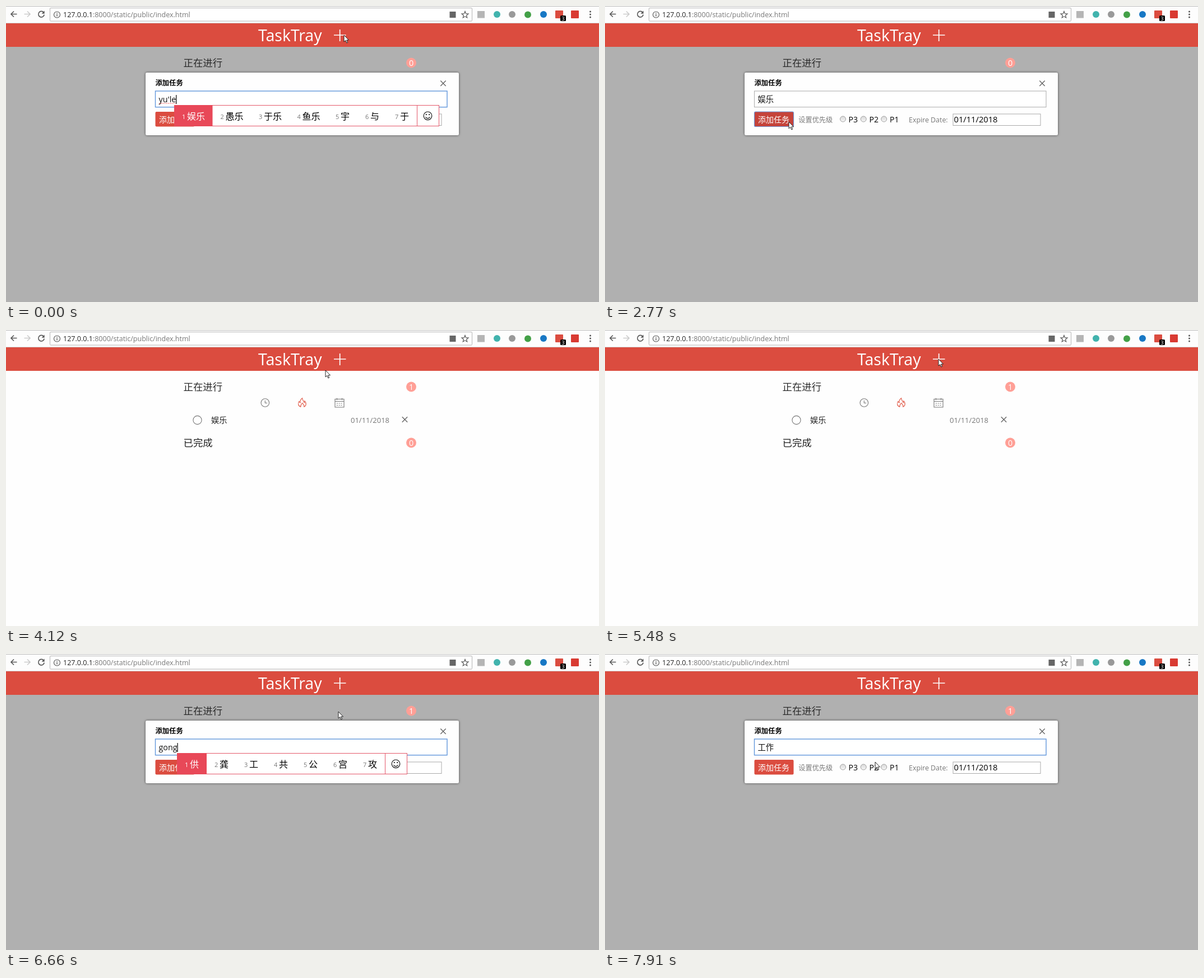
An HTML page for the animation above (8000 ms loop, 1058 px wide and 529 px high).

```html
<!DOCTYPE html>
<html lang="zh-CN">
<head>
<meta charset="utf-8">
<title>TaskTray</title>
<style>
html, body { margin: 0; width: 100%; height: 100%; overflow: hidden; background: #fefefe; }
svg { display: block; width: 1058px; height: 529px; }
text { font-family: "Open Sans", "Noto Sans CJK SC", "Noto Sans CJK", sans-serif; fill: #222; white-space: pre; }
.line { fill: none; stroke: #5a5a5a; stroke-width: 1.7; }
.thin { fill: none; stroke: #777; stroke-width: 1.1; }
.grey { fill: #777; }
.white { fill: #fff; }
.black { fill: #000; }
.mid { text-anchor: middle; }
</style>
</head>
<body>
<svg viewBox="0 0 1058 529">
  <defs>
    <filter id="shadow" x="-5%" y="-15%" width="110%" height="130%">
      <feDropShadow dx="0" dy="0" stdDeviation="2.2" flood-color="#000" flood-opacity=".6"/>
    </filter>
    <linearGradient id="knob" x2="0" y2="1">
      <stop stop-color="#d8d8d8"/><stop offset="1" stop-color="#f6f6f6"/>
    </linearGradient>
    <g id="radio"><circle r="5" fill="url(#knob)" stroke="#a0a0a0"/></g>
    <path id="cross" d="M-4.700-4.700L4.700 4.700M4.700-4.700L-4.700 4.700"/>
  </defs>

  <rect width="1058" height="529" fill="#fefefe"/>
  <rect id="dim" y="73" width="1058" height="456" fill="#b0b0b0"/>

  <!-- browser bar -->
  <rect width="1058" height="31" fill="#fdfdfd"/>
  <path d="M0 .5H1058" stroke="#bcbcbc"/>
  <path d="M0 30.500H1058" stroke="#d5d0d0"/>
  <path class="line" d="M19.500 14.500H9M14 9.500L9 14.500L14 19.500"/>
  <path class="line" style="stroke:#ccc" d="M32.500 14.500H43M38 9.500L43 14.500L38 19.500"/>
  <path class="line" d="M67.200 11.500A5.200 5.200 0 1 0 68.200 15.500"/>
  <path d="M68.700 8.500V13.700H63.500Z" fill="#5a5a5a"/>
  <rect x="78.500" y="3.500" width="753" height="23.500" rx="1.500" fill="#fff" stroke="#b4b4b4"/>
  <circle class="line" style="stroke-width:1.200" cx="91" cy="15.500" r="5.500"/>
  <path d="M91 14.500V18.500M91 12V13.400" stroke="#555" stroke-width="1.300"/>
  <text x="102" y="19.500" font-size="12.500">127.0.0.1<tspan class="grey">:8000/static/public/index.html</tspan></text>
  <rect x="791.500" y="10" width="11" height="11" fill="#666"/>
  <path class="line" style="stroke-width:1.200" d="M819 9.500L820.600 13.600L825 13.900L821.600 16.700L822.700 21L819 18.600L815.300 21L816.400 16.700L813 13.900L817.400 13.600Z"/>
  <rect x="841" y="9" width="13" height="12.500" fill="#b5b5b5"/>
  <circle cx="876" cy="15" r="6" fill="#41b3ad"/>
  <circle cx="903" cy="15" r="6" fill="#999"/>
  <circle cx="931" cy="15.500" r="6" fill="#43a047"/>
  <circle cx="959" cy="15" r="6" fill="#1878c4"/>
  <rect x="980" y="8" width="14" height="14" rx="1" fill="#db4c3f"/>
  <rect x="989" y="17" width="10" height="10" rx="1.500" fill="#000"/>
  <text class="white mid" x="994" y="25.500" font-size="9.500">3</text>
  <rect x="1008" y="8" width="14" height="14" rx="1" fill="#d93a32"/>
  <g fill="#555"><circle cx="1042.500" cy="10" r="1.500"/><circle cx="1042.500" cy="15" r="1.500"/><circle cx="1042.500" cy="20" r="1.500"/></g>

  <!-- page header -->
  <rect y="31" width="1058" height="42" fill="#db4c3f"/>
  <text class="white" x="450" y="63" font-size="28.500">TaskTray</text>
  <path d="M585 52H606.500M595.700 42V63" stroke="#fff" stroke-width="1.700"/>

  <text x="316.500" y="108" font-size="17.400" style="fill:#2b2b2b">正在进行</text>
  <circle cx="723" cy="101.500" r="9" fill="#ff9f96"/>
  <text id="open" class="white mid" x="723" y="106.700" font-size="14.300"></text>

  <g id="list">
    <circle class="thin" cx="462.300" cy="130" r="7.300"/>
    <path class="thin" d="M462.300 126V130.500H466"/>
    <g fill="none" stroke="#e2604f" stroke-width="1.200">
      <path d="M526 137.500C521 135.500 520.500 131.500 523 127.500C523.600 129 524.300 129.800 525.200 130C524.600 126.500 526 123.500 528.600 121.800C528.600 125 531 126.500 532 129.800C532.800 129 533 128 533 127C536.300 131 536 135.500 531.500 137.500"/>
      <path d="M526 137.500C524.500 134.500 527.500 133 528.500 130.500C530.500 133 533 134.500 531.500 137.500"/>
    </g>
    <path class="thin" d="M587 123.500H603V138H587ZM587 127.500H603M590.500 121.500V125M599.500 121.500V125"/>
    <path class="thin" stroke-dasharray="2 1.700" d="M590 131H601M590 134.500H601"/>
    <circle class="thin" cx="341.500" cy="161" r="7.600"/>
    <text x="366" y="166" font-size="14.200">娱乐</text>
    <text class="grey" x="615" y="166" font-size="13">01/11/2018</text>
    <use href="#cross" x="711.500" y="160" stroke="#666" stroke-width="1.400"/>
    <text x="316.500" y="208" font-size="17.400">已完成</text>
    <circle cx="723" cy="201.500" r="9" fill="#ff9f96"/>
    <text class="white mid" x="723" y="206.700" font-size="14.300">0</text>
  </g>

  <g id="dialog">
    <rect x="249" y="119" width="559" height="112" rx="3" fill="#fefefe" filter="url(#shadow)"/>
    <text class="black" x="266.500" y="142" font-size="12.300" font-weight="700">添加任务</text>
    <use href="#cross" x="780" y="138.300" stroke="#666" stroke-width="1.400"/>
    <rect id="field" x="266.500" y="152" width="520.500" height="28.700" fill="#fff"/>
    <text id="entry" x="272.500" y="171.700" font-size="14.300"></text>
    <path id="wave" fill="none" stroke="#f05050" stroke-width="1" stroke-dasharray="2 1.200"/>
    <path id="caret" stroke="#000" stroke-width="1.200"/>
    <rect id="button" x="266.500" y="189" width="70" height="26.500" rx="2"/>
    <text class="white" x="273" y="208" font-size="14">添加任务</text>
    <text class="grey" x="345.300" y="208" font-size="12.200">设置优先级</text>
    <use href="#radio" x="424.500" y="202"/><text class="black" x="434.500" y="208" font-size="14">P3</text>
    <use href="#radio" x="461.200" y="202"/><text class="black" x="471.500" y="208" font-size="14">P2</text>
    <use href="#radio" x="497.700" y="202"/><text class="black" x="508" y="208" font-size="14">P1</text>
    <text class="grey" x="542" y="208" font-size="12.400">Expire Date:</text>
    <rect x="621" y="193" width="156" height="20.500" fill="#fff" stroke="#aaa"/>
    <text class="black" x="622.500" y="208" font-size="14.700">01/11/2018</text>
    <g id="ime"></g>
  </g>

  <path id="mouse" d="M0 0V12L2.800 9.500L4.800 14L6.700 13.200L4.700 8.900H8.500Z" fill="#fff" stroke="#111" stroke-width=".9"/>
</svg>
<script>
const LOOP = 8000;
const $ = id => document.getElementById(id);
const at = (t, x, y, more) => [t, { x, y, ...more }];
const type = (t, text, left, words) => [t, { text, words: words.split(' '), left, caret: true }];
const commit = (t, text) => [t, { text, words: null, caret: true }];

// Each step changes only the listed parts of the state.
const steps = [
  at(0, 603, 52, { dialog: true, focus: true, count: 0 }),
  type(0, "yu'le", 300, '娱乐 愚乐 于乐 鱼乐 宇 与 于'),
  commit(280, '娱乐'),
  [810, { caret: false }],
  at(950, 600, 62), at(1100, 570, 95), at(1240, 520, 150), at(1380, 470, 190, { caret: true }),
  at(1530, 430, 214), at(1680, 395, 217), at(1820, 366, 206),
  at(1950, 352, 205, { caret: false }), at(2090, 340, 206), at(2230, 332, 207, { hover: true }), at(2360, 328, 207),
  [2500, { caret: true }],
  [2770, { focus: false, caret: false }],
  [2920, { dialog: false, hover: false, count: 1 }],
  at(3070, 335, 203), at(3210, 375, 180), at(3360, 440, 140), at(3510, 510, 100), at(3650, 570, 66), at(3800, 597, 56),
  at(3970, 590, 59), at(4110, 570, 72), at(4250, 540, 92), at(4400, 510, 110), at(4540, 495, 118),
  at(4820, 500, 116), at(4950, 520, 104), at(5080, 552, 82), at(5220, 580, 62), at(5350, 592, 54), at(5480, 595, 52),
  [5600, { dialog: true, focus: true, text: '', caret: true }],
  at(5750, 593, 99), at(5870, 593, 103),
  [6120, { caret: false }],
  type(6520, 'gon', 298, '公司 工作 公共 供 工 共 公'),
  type(6660, 'gong', 305, '供 龚 工 共 公 宫 攻'),
  type(6930, "gong'z", 313, '工作 公子 工资 共振 工 共 公'),
  type(7070, "gong'zuo", 331, '工作 供作 宫作 工 共 公 供'),
  commit(7320, '工作'),
  at(7750, 545, 145),
  at(7910, 482, 193, { caret: false })
];

const show = (id, on) => $(id).setAttribute('visibility', on ? 'visible' : 'hidden');
const set = (id, attrs) => { for (const k in attrs) $(id).setAttribute(k, attrs[k]); };

function candidates(words, left) {
  let x = left, items = '';
  words.forEach((word, i) => {
    const w = 37.5 + 15.5 * word.length, first = i === 0;
    if (first) items += `<rect x="${x}" y="177" width="${w}" height="38" fill="#e84858"/>`;
    items += `<text class="${first ? 'white' : 'grey'}" x="${x + 14}" y="202" font-size="11">${i + 1}</text>` +
      `<text class="${first ? 'white' : 'black'}" x="${x + 23}" y="203" font-size="16">${word}</text>`;
    x += w;
  });
  const cx = x + 19.5, line = Math.floor(x) + 0.5;
  return `<rect x="${left + 0.5}" y="177.5" width="${line + 38.5 - left}" height="37" fill="#fff" stroke="#e4586a"/>${items}` +
    `<path d="M${line} 177V215" stroke="#e4586a"/>` +
    `<g fill="none" stroke="#111" stroke-width="1.2"><circle cx="${cx}" cy="196.300" r="7.300"/>` +
    `<path d="M${cx - 4} 198.300Q${cx} 203.500 ${cx + 4} 198.300"/></g>` +
    `<circle cx="${cx - 2.7}" cy="194" r="1.100"/><circle cx="${cx + 2.7}" cy="194" r="1.100"/>`;
}

function render(s) {
  set('mouse', { transform: `translate(${s.x} ${s.y})` });
  $('open').textContent = s.count;
  show('dim', s.dialog);
  show('list', !s.dialog);
  $('dialog').style.display = s.dialog ? '' : 'none';
  if (!s.dialog) return;

  const entry = $('entry');
  entry.textContent = s.text || '请输入todo item';
  entry.style.fill = s.text ? '#111' : '#777';
  const end = 272.5 + (s.text ? entry.getComputedTextLength() : 0);
  set('caret', { d: `M${end + 0.5} 159V175` });
  $('caret').style.display = s.caret ? '' : 'none';
  set('wave', { d: `M273 174H${end}` });
  $('wave').style.display = s.text.includes("'") ? '' : 'none';
  set('field', { stroke: s.focus ? '#6297dc' : '#aaa', 'stroke-width': s.focus ? 1.4 : 1 });
  set('button', { fill: s.hover ? '#c5433a' : '#db4c3f', stroke: s.focus ? 'none' : '#6a9ade', 'stroke-width': 1.2 });
  $('ime').innerHTML = s.words ? candidates(s.words, s.left) : '';
}

let last = -1;
function tick() {
  const t = performance.now() % LOOP;
  const past = steps.filter(step => step[0] <= t);
  if (past.length !== last) {
    last = past.length;
    render(Object.assign({}, ...past.map(step => step[1])));
  }
  requestAnimationFrame(tick);
}
tick();
</script>
</body>
</html>
```
